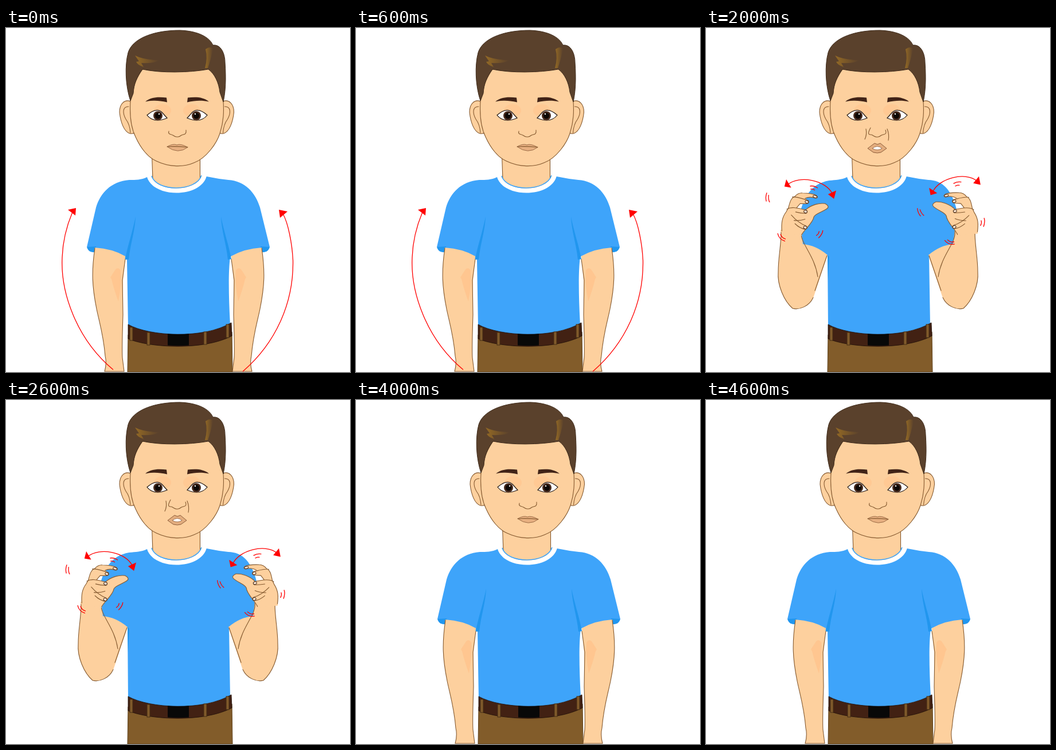
Write an HTML page that moves like this. It is 600 by 600 pixels and loops after 5000 ms.

```html
<!DOCTYPE html>
<html lang="en">
<head>
<meta charset="utf-8">
<title>Arm gesture</title>
<style>
  html, body { margin: 0; width: 100%; height: 100%; overflow: hidden; background: #fff; }
  svg { display: block; width: 100vw; height: 100vh; }
  .skin { fill: #fdd09e; }
  .line { stroke: #84592f; stroke-width: 1.1; stroke-linejoin: round; stroke-linecap: round; }
  .open { fill: none; }
  .blue { fill: #3ea4fa; }
  .shade { fill: #2196ee; }
  .blush { fill: #ffc690; }
  .nail { fill: #fbe3cd; stroke: #4a2f20; }
  .red path { fill: none; stroke: #f00; stroke-width: 1.3; }
  .red polygon { fill: #f00; }
</style>
</head>
<body>
<svg viewBox="0 0 600 600">
  <defs>
    <linearGradient id="shine" x2="1">
      <stop stop-color="#946a25"/><stop offset="1" stop-color="#5a412c"/>
    </linearGradient>

    <g id="lowArm">
      <path class="shade" d="M141 382C143 390 150 392 157 391L157 381Z"/>
      <path class="skin" d="M155 383Q186 385 208 398L204 440L204 500Q202 560 203 575L206 599H172Q176 585 173 572C170 535 162 510 158 490C150 450 149 425 155 383Z"/>
      <path class="line open" d="M155 384C149 425 150 450 158 490C162 510 170 535 173 572Q176 585 172 599H206L203 575Q202 560 204 500L203 440L208 403"/>
      <path class="blush" d="M182 435L191 421Q196 416 200 423Q202 445 196 477Q188 455 184 438Z"/>
      <path class="shade" d="M226 329C225 355 217 375 214 404L208 403C212 380 221 355 226 329Z"/>
    </g>

    <g id="wideArm">
      <path class="shade" d="M152 380L155 371L162 377L158 382Z"/>
      <path class="skin" d="M160 377Q190 378 212 396C205 420 195 450 187 468C178 488 162 493 152 488C130 475 118 445 116 425C114 400 105 380 103 362H138Q144 375 153 387Z"/>
      <path class="line open" d="M103 364C105 380 114 400 116 425C118 445 130 475 152 488C162 493 178 488 187 468C195 450 205 420 212 396M138 361C144 385 166 395 186 427"/>
    </g>

    <g id="closeArm">
      <path class="skin" d="M130 352H166L169 377Q192 379 212 396L188 468C180 486 162 492 151 489C136 476 124 448 126 425C126 400 132 380 130 352Z"/>
      <path class="line open" d="M131 356C131 380 126 400 126 425C124 448 136 476 151 489C162 492 180 486 187 470M211 397L190 458M166 354C163 375 189 394 195 434"/>
    </g>

    <g id="hand">
      <path class="skin" d="M103 367C99 352 97 342 102 330L104 322C104 312 104 304 110 300C113 294 116 292 121 291Q138 287 146 289Q151 292 146 294Q135 293 128 299L134 301Q138 304 134 307L122 310L118 318L134 318C142 306 155 300 164 299Q173 301 170 306C164 314 152 320 151 326C152 338 141 350 138 364Z"/>
      <path class="line open" d="M103 364C99 352 97 342 102 330L104 322C104 312 104 304 110 300C113 294 116 292 121 291Q138 287 146 289Q151 292 146 294Q135 293 128 299M106 302C115 299 126 301 134 301Q138 304 134 307L122 310L118 318M102 325C110 317 125 319 134 318Q140 321 136 324Q126 326 118 326M134 318C142 306 155 300 164 299Q173 301 170 306C164 314 152 320 151 326C152 338 141 350 138 362M112 333C122 340 132 344 142 345Q147 348 142 351Q132 352 122 346M119 341Q130 339 137 334"/>
      <ellipse class="nail" cx="144" cy="291.5" rx="3.6" ry="2"/>
      <ellipse class="nail" cx="132.5" cy="304" rx="3" ry="2.3"/>
      <ellipse class="nail" cx="134.5" cy="321" rx="3" ry="2.4"/>
      <ellipse class="nail" cx="141" cy="348" rx="3" ry="2.4"/>
    </g>

    <g id="marks" class="red">
      <path d="M93 283C108 262 155 259 172 279M61 306Q60 314 64 321M65 309Q66 317 70 321M131 276Q138 273 145 276M133 281Q137 279 141 281M172 345Q173 352 168 360M166 348Q167 353 163 357M97 370Q102 380 113 380M102 370Q106 376 113 376"/>
      <polygon points="88,288 88,275 100,287"/>
      <polygon points="177,272 177,287 165,282"/>
    </g>

    <g id="eye">
      <ellipse class="blush" cx="273" cy="144" rx="15" ry="11" opacity=".7"/>
      <path fill="#fff" stroke="#23150f" stroke-width="1.2" d="M246 152Q263 137 273 148Q278 154 281 157Q258 167 246 152Z"/>
      <circle cx="265" cy="153" r="8" fill="#46291c"/>
      <circle cx="265" cy="153" r="5.2" fill="#0c0706"/>
      <circle cx="267" cy="150" r="1.2" fill="#fff"/>
      <path fill="#412317" d="M243 128.500C253 119.500 268 120 280 121.500L281 129.500C266 126 255 126 243 128.500Z"/>
    </g>
    <path id="ear" class="skin line" d="M217 128C207 124 198 132 198 147C200 165 206 181 216 184Q222 185 226 182Z"/>
    <path id="earFold" class="line open" d="M214 137C203 137 203 148 209 159Q216 168 217 183"/>
  </defs>

  <g id="figure">
    <path fill="#825c2a" stroke="#5f421d" d="M213 535L212 600H395L394 530Z"/>

    <g data-on="04">
      <path class="blue" d="M246 260C236 265 226 265 215 265C183 268 165 287 157 313L141 382L155 384Q186 386 209 404H211L213 522Q300 550 391 518C389 480 387 430 391 399Q415 386 446 384L460 382L443 313C435 287 417 267 388 265Q369 263 350 259Z"/>
      <use href="#lowArm"/>
      <use href="#lowArm" transform="matrix(-1 0 0 1 601 0)"/>
    </g>
    <g data-on="123">
      <path class="blue" d="M246 260C236 265 226 265 215 266C181 272 168 297 160 340L152 380L160 378Q190 379 212 397L213 522Q300 550 391 518L389 397Q410 379 440 378L448 380C443 345 439 316 431 298C423 280 412 266 388 265Q369 263 350 259Z"/>
      <path class="shade" d="M212 396L215 399L213 440Z"/>
    </g>

    <path fill="#422113" stroke="#1f100a" stroke-width=".8" d="M213 517C250 538 345 543 393 514L394 537C345 563 250 558 213 542Z"/>
    <path fill="#080808" d="M282 533.500Q301 535 319 533.500V553.500Q301 555 282 553.500Z"/>
    <g fill="#805a2b" stroke="#452c14">
      <rect x="216" y="522" width="5" height="23"/>
      <rect x="246" y="531" width="5" height="22"/>
      <rect x="345" y="530" width="5" height="22"/>
      <rect x="384" y="517" width="5" height="23"/>
    </g>

    <path class="skin" d="M255 222V260C264 287 332 287 339 260V222Z"/>
    <path class="line open" d="M254.500 222L256 264M338.500 222V262"/>
    <path fill="#fff" d="M246 260C257 297 340 297 350 258L341 258C332 287 262 287 254 258Z"/>
    <path fill="none" stroke="#3ea4fa" stroke-width="1.500" d="M254 258C262 286 332 286 341 257"/>

    <use href="#ear"/><use href="#earFold"/>
    <g transform="matrix(-1 0 0 1 595.500 0)"><use href="#ear"/><use href="#earFold"/></g>
    <path class="skin line" d="M238 72C222 95 220 112 217 128C215 160 221 180 226 190C235 210 248 226 262 232C285 243 310 243 328 235C350 227 368 200 373 184C380 162 380 145 379 128C373 100 366 80 353 70Z"/>
    <path fill="#5a412c" stroke="#3f2b1b" d="M217 127C208 100 207 65 213 43C220 19 256 4 303 4C335 5 355 16 361 30C375 28 382 45 382 60C384 90 383 110 379 129L373 112C371 95 364 80 353 72C320 78 270 79 238 72C228 86 223 98 222 114Z"/>
    <path fill="url(#shine)" d="M225 48Q242 56 267 56Q260 62 236 61L240 68Q230 65 227 59L232 58Z"/>
    <path fill="url(#shine)" d="M347 70Q352 52 348 37Q356 31 361 36Q357 56 352 70Z"/>
    <use href="#eye"/>
    <use href="#eye" transform="matrix(-1 0 0 1 597 0)"/>

    <g data-on="04">
      <path class="line open" d="M284 180C282 186 288 185 291 187Q299 193 306 187C311 185 315 186 314 178"/>
      <path fill="#e8b081" stroke="#9a6b45" d="M281 207Q292 201 298 204Q304 201 317 208Q300 221 281 207Z"/>
      <path class="line open" d="M281 207Q298 206 317 208"/>
    </g>
    <g data-on="123">
      <path class="line open" d="M287 174C284 180 281 186 287 186Q290 186 292 188Q299 193 306 187C311 185 316 186 313 178M279 176Q281 186 277 194M316 176Q320 186 318 196"/>
      <path fill="#e3ad7e" stroke="#8d5d3a" d="M282 210L294 201L299 203L304 201L315 210L305 217Q299 219 292 217Z"/>
      <path fill="#fff" stroke="#8d5d3a" stroke-width=".8" d="M290 210Q299 203 307 210Q299 215 290 210Z"/>
    </g>

    <g data-on="13">
      <use href="#wideArm"/>
      <use href="#wideArm" transform="matrix(-1 0 0 1 600 0)"/>
    </g>
    <g data-on="2">
      <use href="#closeArm"/>
      <use href="#closeArm" transform="matrix(-1 0 0 1 600 0)"/>
    </g>
    <g data-on="123">
      <g id="left"><use href="#hand"/><use href="#marks"/></g>
      <g id="right">
        <use href="#hand" transform="matrix(-1 0 0 1 600 0)"/>
        <use href="#marks" transform="translate(341 -2.500)"/>
      </g>
    </g>

    <g data-on="0" class="red">
      <path d="M187 596C122 542 95 460 98 400C99 370 108 340 116 321M413 599C470 550 502 480 500.500 405C499 375 492 340 483 324"/>
      <polygon points="108,317 122,314 121,327"/>
      <polygon points="476,317 491,320 478,331"/>
    </g>
  </g>
</svg>
<script>
  const byId = id => document.getElementById(id);
  const parts = document.querySelectorAll('[data-on]');
  const move = (id, value) => byId(id).setAttribute('transform', value);
  let shown = -1;

  function draw() {
    const step = Math.floor(performance.now() / 1000) % 5;
    if (step !== shown) {
      shown = step;
      for (const part of parts)
        part.style.display = part.dataset.on.includes(step) ? '' : 'none';
      const close = step === 2;
      move('left', close ? 'translate(43 -18) rotate(14.5 65 314)' : '');
      move('right', close ? 'translate(-32 10) rotate(-11 405 311)' : '');
      move('figure', step === 4 ? 'translate(1 0)' : '');
    }
    requestAnimationFrame(draw);
  }
  draw();
</script>
</body>
</html>
```
